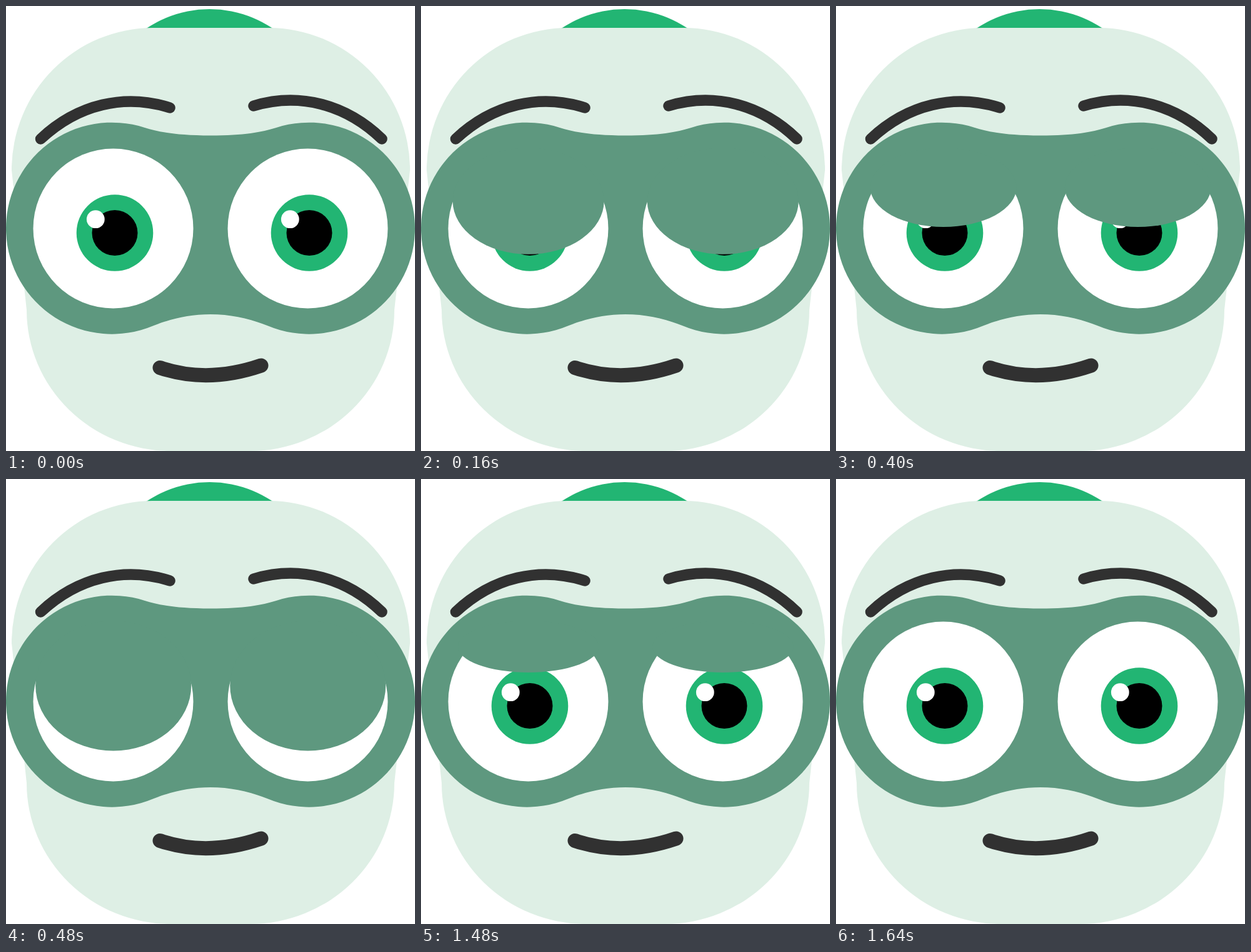
An HTML page that plays this animation: 654x713 px, repeating every 3 s.

```html
<!DOCTYPE html>
<html lang="en">
<head>
<meta charset="utf-8">
<title>Blinking face</title>
<style>
  html, body { margin: 0; width: 100%; height: 100%; overflow: hidden; background: #fff; }
  svg { display: block; width: 654px; height: 713px; }
  .skin { fill: #deefe5; }
  .green { fill: #22b573; }
  .mask { fill: #5e987f; }
  .line { fill: none; stroke: #313131; stroke-width: 17.5; stroke-linecap: round; }
</style>
</head>
<body>
<svg viewBox="0 0 654 713">
  <circle class="green" cx="325.5" cy="185" r="180"/>
  <path class="skin" d="M235 35H420A226 228 0 0 1 646 263L621 487A231 226 0 0 1 390 713H264A231 226 0 0 1 33 487L9 263A226 228 0 0 1 235 35Z"/>
  <path class="line" d="M55.5 213C115 157 190 140 262 163"/>
  <path class="line" d="M396 160C468 138 543 157 601 213"/>
  <path class="line" style="stroke-width:23" d="M246 579.5Q322 605.5 408 576"/>
  <path class="mask" d="M235 512.5A169.5 169.5 0 1 1 222 195C245 202 273 207.5 327 207.5S409 202 432 195A169.5 169.5 0 1 1 419 512.5C390 501 360 494 327 494S264 501 235 512.5Z"/>
  <g id="eye">
    <circle cx="171.5" cy="356.5" r="128" fill="#fff"/>
    <circle class="green" cx="174" cy="363.5" r="61.3"/>
    <circle cx="174" cy="363.5" r="36.5"/>
    <circle cx="143.3" cy="341.7" r="14.4" fill="#fff"/>
    <ellipse id="lid" class="mask" cx="171.7" cy="228" rx="0" ry="0"/>
  </g>
  <use href="#eye" x="311"/>
</svg>
<script>
  const LOOP = 3000, STEP = 40, HALF_BLINK = 100, LID_TOP = 227;
  const blinks = [
    { start: 20, depth: 1 },
    { start: 350, depth: 1 },
    { start: 1438, depth: 0.91 }
  ];
  const lid = document.getElementById('lid');

  function easeInOut(x) {
    const a = x ** 1.7, b = (1 - x) ** 1.7;
    return a / (a + b);
  }

  // 0 = open, 1 = fully closed
  function closure(t) {
    for (const { start, depth } of blinks) {
      const x = 1 - Math.abs(t - start - HALF_BLINK) / HALF_BLINK;
      if (x > 0) return depth * easeInOut(x);
    }
    return 0;
  }

  function draw() {
    const t = Math.floor(performance.now() % LOOP / STEP) * STEP;
    const p = closure(t);
    const bottom = 222 + 264 * p;
    const ry = Math.max(0, (bottom - LID_TOP) / 2);
    lid.setAttribute('cy', LID_TOP + ry);
    lid.setAttribute('rx', 104.6 + 24.6 * p);
    lid.setAttribute('ry', ry);
    requestAnimationFrame(draw);
  }
  draw();
</script>
</body>
</html>
```
